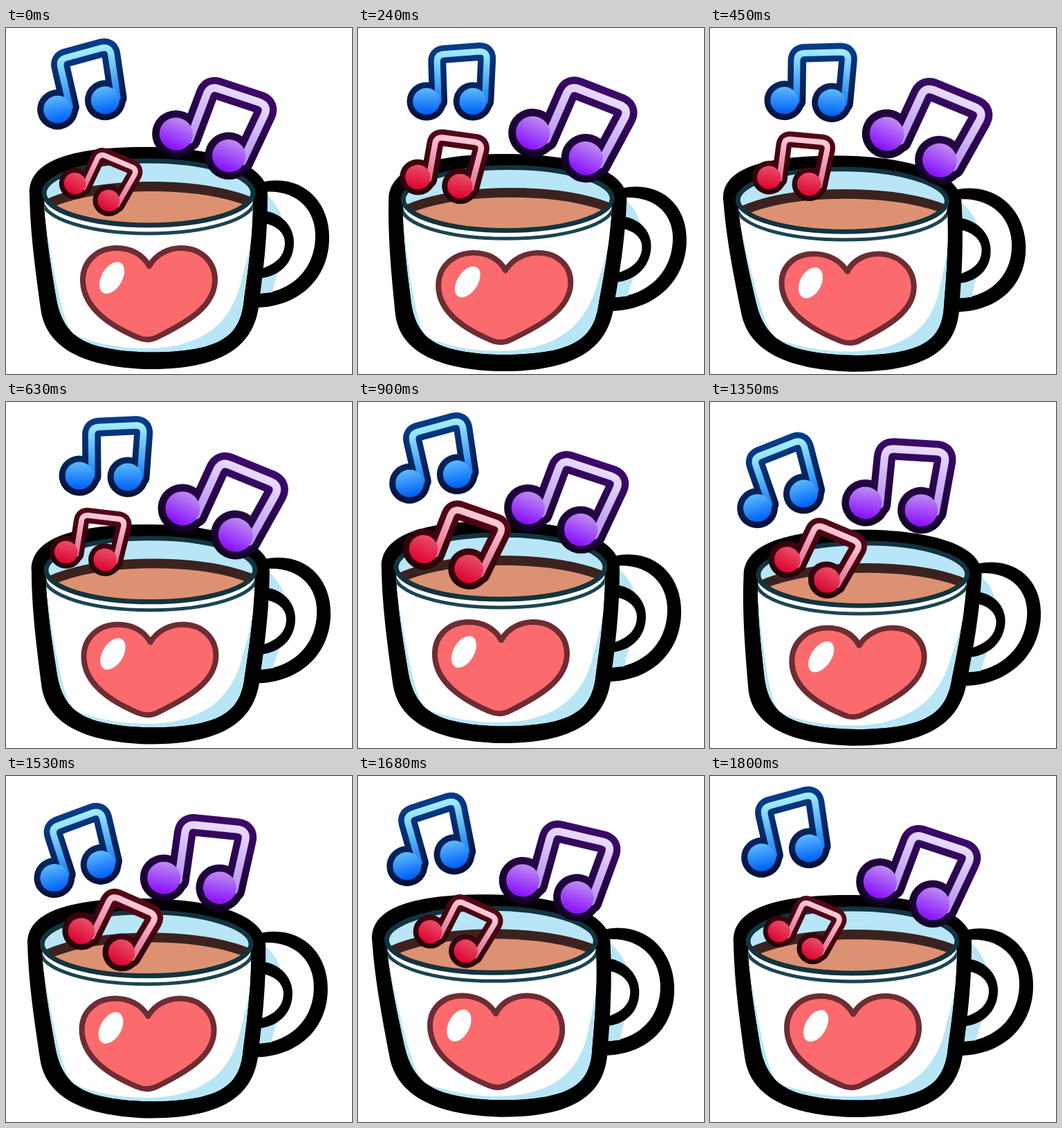
Animation of 500x500 px, one loop 1.83 s. Source, as an HTML page:

```html
<!DOCTYPE html>
<html lang="en">
<head>
<meta charset="utf-8">
<title>Musical mug</title>
<style>
  html, body { margin: 0; width: 100%; height: 100%; overflow: hidden; background: #fff; }
  svg { display: block; width: 100vw; height: 100vh; }
</style>
</head>
<body>
<svg viewBox="0 0 500 500" xmlns="http://www.w3.org/2000/svg">
  <defs>
    <path id="body" d="M55 238 C55 213 123 192 206 192 S357 213 357 238 C357 300 350 350 344 392 C340 436 320 455 272 464 C230 471 175 470 138 461 C98 452 80 430 73 393 C66 350 55 290 55 238Z"/>
    <ellipse id="rim" cx="206" cy="238.5" rx="151" ry="46.500"/>
    <clipPath id="bodyClip"><use href="#body"/></clipPath>
    <clipPath id="rimClip"><use href="#rim"/></clipPath>
  </defs>

  <g id="mug">
    <path d="M350 229 C415 202 467 241 467 303 C467 364 420 406 355 404Z"/>
    <path fill="#fff" d="M370 237 C418 232 447 261 447 300 C447 350 410 384 360 384Z"/>
    <path fill="#b8e6f7" d="M372 237 Q394 254 400 278 L372 266Z M360 384 L385 382 Q390 354 404 332 L372 350Z"/>
    <path d="M365 264 C394 263 416 284 416 310 C416 340 394 362 360 362Z"/>
    <path fill="#fff" d="M365 281 C392 283 404 298 403 312 C402 330 390 342 365 349Z"/>

    <path d="M34 240 C32 200 75 172 200 172 C300 172 378 195 378 240 C378 300 372 350 366 395 C361 455 320 494 205 493 C100 490 56 455 50 405 C44 360 35 300 34 240Z"/>
    <g clip-path="url(#bodyClip)">
      <use href="#body" fill="#b8e6f7"/>
      <path fill="#fff" d="M50 240 H362 C360 290 350 330 341 361 C330 414 300 446 250 458 C205 468 145 463 100 444 C78 433 62 300 50 240Z"/>
      <path fill="none" stroke="#1b4552" stroke-width="5" d="M53 250 A153 47 0 0 0 359 250"/>
    </g>
    <use href="#rim" fill="#b8e6f7"/>
    <g clip-path="url(#rimClip)">
      <ellipse cx="210" cy="282" rx="175" ry="53" fill="#dc9272" stroke="#3c221f" stroke-width="14"/>
    </g>
    <use href="#rim" fill="none" stroke="#12343f" stroke-width="7"/>

    <path fill="#fb6b6d" stroke="#6e2c33" stroke-width="8" stroke-linejoin="round" d="M207 344 C197 326 179 318 160 318 C131 318 111 338 111 364 C111 404 150 430 190 447 Q205 454 220 446 C262 425 302 402 302 364 C302 338 282 318 253 318 C236 318 217 326 207 344Z"/>
    <ellipse cx="153" cy="361" rx="15" ry="25" fill="#fff" transform="rotate(30 153 361)"/>
  </g>
  <g id="notes"></g>
</svg>

<script>
const LOOP = 1830, TICK = 30, STEPS = 32;
const mug = document.getElementById('mug');
const layer = document.getElementById('notes');

// Each pose is [x, y, degrees, scale], reached at the matching step in KEYS.
const KEYS = [0, 4, 11, 16, 20, 27];
const blueRest = [109, 111, -11, 1];
const purpleRest = [284, 169, 22.5, 1.18];
const notes = [
  { id: 'blue',
    line: ['#a4f0ff', '#0f78f5'], head: ['#58b6fb', '#0062fa'], edge: ['#063d8c', '#020f35'],
    poses: [blueRest, [132.5, 106, 0, 0.96], [141, 107.5, 1.5, 1],
            blueRest, [102, 140.5, -17, 1], [103.5, 137.5, -16, 1]] },
  { id: 'purple',
    line: ['#eadcff', '#b58cee'], head: ['#bb86f2', '#8a12ff'], edge: ['#3c0a6c', '#100022'],
    poses: [purpleRest, [291, 170, 25.5, 1.21], [293.5, 173, 26.5, 1.22],
            purpleRest, [266, 152, 9, 1.16], [268.5, 154.5, 10, 1.17]] },
  { id: 'red',
    line: ['#ffcbd9', '#e0688c'], head: ['#ea4a64', '#dd0632'], edge: ['#560716', '#260007'],
    poses: [[124, 237, 27, 0.78], [117, 222, 12, 0.89], [115, 222.5, 11, 0.82],
            [127.5, 227, 23.5, 1.02], [139, 243.5, 25.5, 0.88], [138, 239.5, 28, 0.94]] }
];

function gradient(id, [top, bottom], y1, y2) {
  return `<linearGradient id="${id}" gradientUnits="userSpaceOnUse" x1="0" x2="0" y1="${y1}" y2="${y2}">
    <stop stop-color="${top}"/><stop offset="1" stop-color="${bottom}"/></linearGradient>`;
}

function noteMarkup({ id, line, head, edge }) {
  const stems = 'M-17 0 L-19 -60 Q-19 -70 -9 -71 L45 -75 Q56 -75 56 -64 L53 0';
  const heads = (grow, paint) => [-35, 35].map(x =>
    `<ellipse cx="${x}" rx="${20.5 + grow}" ry="${20 + grow}" fill="url(#${paint})"/>`).join('');
  const stroke = (width, paint) =>
    `<path d="${stems}" fill="none" stroke="url(#${paint})" stroke-width="${width}" stroke-linecap="round" stroke-linejoin="round"/>`;
  return `<g id="${id}">
    ${gradient(id + 'Line', line, -78, 4)}
    ${gradient(id + 'Head', head, -18, 18)}
    ${gradient(id + 'Edge', edge, -88, 32)}
    ${stroke(27, id + 'Edge')}${heads(9, id + 'Edge')}
    ${stroke(9.5, id + 'Line')}${heads(0, id + 'Head')}
  </g>`;
}

layer.innerHTML = notes.map(noteMarkup).join('');
notes.forEach(note => { note.el = document.getElementById(note.id); });

// Smooth closed curve through the key poses.
function poseAt(poses, step) {
  const n = KEYS.length;
  const time = k => KEYS[(k + n) % n] + Math.floor(k / n) * STEPS;
  const pose = k => poses[(k + n) % n];
  const k = KEYS.findLastIndex(key => key <= step);
  const span = time(k + 1) - time(k);
  const u = (step - time(k)) / span;
  return pose(k).map((from, axis) => {
    const slope = j => (pose(j + 1)[axis] - pose(j - 1)[axis]) / (time(j + 1) - time(j - 1)) * span;
    const to = pose(k + 1)[axis];
    return from + (to - from) * u * u * (3 - 2 * u)
      + slope(k) * u * (1 - u) ** 2 - slope(k + 1) * u * u * (1 - u);
  });
}

function draw(ms) {
  const tick = Math.floor((ms % LOOP) / TICK);
  const step = Math.floor((tick + 0.49) * STEPS / 60) % STEPS;
  const angle = 2 * Math.PI * step / STEPS;

  // The mug leans three times per loop while it dips and squashes on its base.
  const lean = 0.058 * Math.sin(3 * angle);
  const dip = 6.2 * (1 - Math.cos(2 * angle)) + 3.8 * Math.sin(2 * angle);
  const base = 492, squash = 1 - 0.0022 * dip;
  mug.setAttribute('transform',
    `matrix(1 0 ${-lean} ${squash} ${lean * base} ${base * (1 - squash) + 0.3 * dip})`);

  for (const { el, poses } of notes) {
    const [x, y, turn, scale] = poseAt(poses, step);
    el.setAttribute('transform', `translate(${x} ${y}) rotate(${turn}) scale(${scale})`);
  }
}

const start = performance.now();
function frame() {
  draw(performance.now() - start);
  requestAnimationFrame(frame);
}
frame();
</script>
</body>
</html>
```
